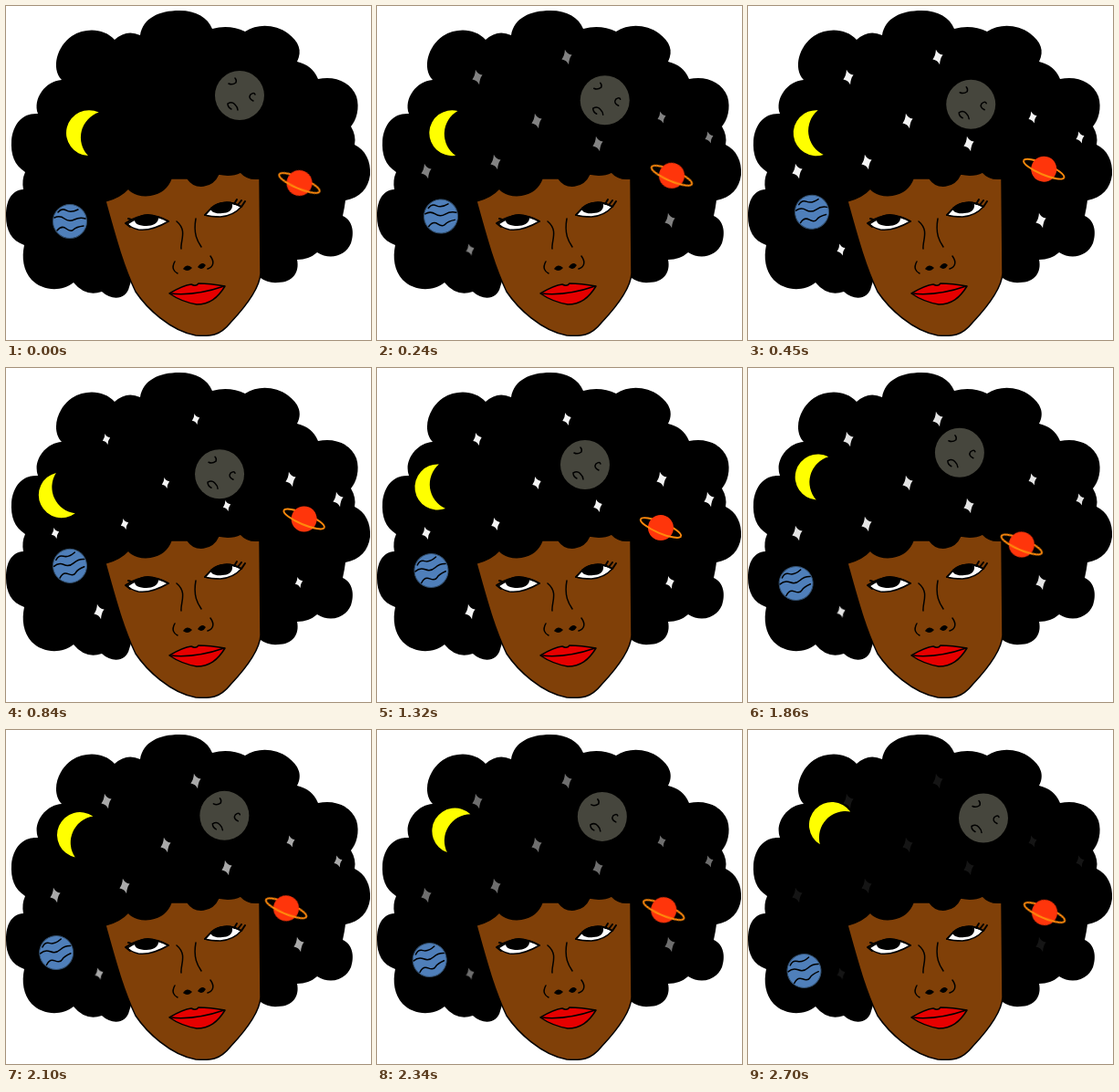
An HTML page for the animation above (2.73 s loop, 400 px wide and 366 px high).

```html
<!DOCTYPE html>
<html lang="en">
<head>
<meta charset="utf-8">
<title>Cosmic hair</title>
<style>
  html, body { margin: 0; width: 100%; height: 100%; overflow: hidden; background: #fff; }
  svg { display: block; width: 100%; height: 100%; }
  .line { fill: none; stroke: #000; stroke-width: 1.5; stroke-linecap: round; stroke-linejoin: round; }
</style>
</head>
<body>
<svg viewBox="0 0 400 366">
  <path id="hair" d="M147 32C150 13 168 5 190 5C209 5 221 13 226 25Q245 20 262 28C276 19 295 20 309 30C321 39 325 49 319 61Q336 65 342 80C360 76 378 83 384 99C388 112 384 125 378 132Q384 142 382 152C394 158 400 170 399 185C397 200 388 210 372 213Q371 221 369 230C380 235 382 248 378 260C372 274 355 279 341 270Q332 278 319 278C322 292 314 303 298 303Q287 304 279 298L240 260L150 260L135 308C132 321 117 324 105 313Q87 319 74 303C60 314 40 312 28 300C19 290 17 276 20 262C6 257 0 246 0 230C0 213 6 202 19 201Q17 191 21 182C9 174 5 163 6 147C8 129 18 117 35 118C29 102 43 82 61 81C49 68 56 44 72 33C88 23 108 25 119 37Q132 25 147 32Z"/>
  <g class="line">
    <path fill="#804008" d="M109 214Q125 210 134 200C144 212 173 211 181 189Q192 189 199 189C207 201 226 200 233 184Q247 187 257 182Q265 191 278 189L279 293C278 310 262 330 246 347C234 362 224 362 208 361C180 356 154 331 142 313C128 284 119 250 109 214Z"/>
    <path fill="#fff" d="M133 239Q155 223 178 236Q159 247 145 245Q137 243 133 239Z"/>
    <path fill="#000" stroke="none" d="M141 233Q154 224 167 231C168 238 160 241 154 241C146 241 140 239 141 233Z"/>
    <path stroke-width="2" d="M131 238Q155 222 178 236M131 238l5 4M137 234l-3-1"/>
    <path fill="#fff" d="M218 229Q236 207 258 220Q249 230 235 231Q224 231 218 229Z"/>
    <path fill="#000" stroke="none" d="M224 221Q236 211 248 217C249 224 243 227 237 227C230 228 224 226 224 221Z"/>
    <path stroke-width="2" d="M218 229Q235 207 258 220M250 217l3-5M254 218l4-5M258 220l4-6"/>
    <path d="M187 236C199 246 191 257 192 266M208 233C205 250 210 258 214 264M185 280C181 287 184 291 188 293M224 274C229 281 227 286 221 288"/>
    <path fill="#000" d="M195 288q3-5 8-1q-4 4-8 1M211 286q3-5 7-2q-3 5-7 2"/>
    <path fill="#e60000" d="M179 315Q194 306 203 305Q208 308 211 304Q223 304 240 307C232 320 223 327 209 327Q192 324 179 315Z"/>
    <path d="M180 315Q207 318 239 307"/>
  </g>
  <g id="stars" fill="#f4f4f4"></g>
  <path id="crescent" fill="#ff0" d="M3.5-24.5A25 25 0 1 0 3.5 24.5A29 29 0 0 1 3.5-24.5Z"/>
  <g id="moon">
    <circle r="27" fill="#46463d"/>
    <path class="line" d="M-12-13q4 2 8-1q1-3-1-5M15 6q-6-3-3-7q4-3 5 0M-13 9q5-3 8 1q3 3 3 6M-13 9q0 4 4 6"/>
  </g>
  <g id="blue">
    <circle r="18.5" fill="#4f7fba" stroke="#33506f"/>
    <path class="line" stroke-width="1.2" d="M-13-10q4-5 9-2t13-1M-17-4q6-3 11 1t11 1t12-1M-14 10q5-6 10-2t8 1t11-4"/>
  </g>
  <g id="ringed">
    <g transform="rotate(23)" fill="none" stroke="#ff8a0c" stroke-width="2">
      <path d="M-24 0A24 6 0 0 1 24 0"/>
      <circle r="14" fill="#ff350b" stroke="none"/>
      <path d="M-24 0A24 6 0 0 0 24 0"/>
    </g>
  </g>
</svg>
<script>
  const LOOP = 2730, LEG = 900;
  const byId = id => document.getElementById(id);
  const mix = (a, b, u) => a + (b - a) * u;
  const clamp = u => Math.max(0, Math.min(1, u));

  // Linear interpolation over [time, value] pairs
  function track(keys, t) {
    let i = 1;
    while (i < keys.length - 1 && t > keys[i][0]) i++;
    const [t0, a] = keys[i - 1], [t1, b] = keys[i];
    return mix(a, b, clamp((t - t0) / (t1 - t0)));
  }

  // Three legs: straight, curved around a control point, straight
  const bodies = [
    { id: 'crescent', path: [[92.5, 139.5], [60, 138.5], [68.5, 129.7], [77, 121], [93, 105]],
      turn: [[0, 14], [900, -28], [1800, 14], [2700, 43]] },
    { id: 'moon', path: [[256, 98], [232.5, 117.5], [224.5, 105.4], [230, 92.5], [258, 96.5]] },
    { id: 'blue', path: [[70, 236], [70, 215.5], [56.8, 220.5], [52, 234], [61.5, 264]],
      turn: [[0, 0], [900, -16]] },
    { id: 'ringed', path: [[321.5, 194], [327, 163.5], [307.6, 173.7], [298, 193], [325, 200]] }
  ];

  function position(path, t) {
    const leg = Math.min(2, Math.floor(t / LEG)), u = clamp(t / LEG - leg);
    const [a, b, c, d, e] = path;
    return [0, 1].map(k =>
      leg === 0 ? mix(a[k], b[k], u) :
      leg === 2 ? mix(d[k], e[k], u) :
      mix(mix(b[k], c[k], u), mix(c[k], d[k], u), u));
  }

  const mainPulse = [[0, 1], [450, 1], [900, .7], [1800, 1], [2700, 1]];
  const sidePulse = [[0, .8], [450, .8], [540, 1], [1650, 1], [1800, .8], [2700, .8]];
  const fade = [[0, 0], [450, 1], [1800, 1], [2790, 0]];
  const starField = byId('stars');

  const addStars = (pulse, points) => points.map(([x, y]) => {
    const el = document.createElementNS('http://www.w3.org/2000/svg', 'path');
    el.setAttribute('d', 'M0-8.5Q1-3 6-1Q2 2 0 8.5Q-1 3-6 1Q-2-2 0-8.5Z');
    starField.append(el);
    return { el, x, y, pulse };
  });

  const stars = [
    ...addStars(mainPulse, [[110, 78], [208, 56], [175, 126], [130, 171], [242, 151], [54, 181], [321, 235]]),
    ...addStars(sidePulse, [[312, 122], [364, 144], [102, 267]])
  ];

  function draw() {
    const t = performance.now() % LOOP;
    for (const { id, path, turn } of bodies) {
      const [x, y] = position(path, t);
      byId(id).setAttribute('transform', `translate(${x} ${y}) rotate(${turn ? track(turn, t) : 0})`);
    }
    starField.setAttribute('opacity', track(fade, t));
    for (const { el, x, y, pulse } of stars)
      el.setAttribute('transform', `translate(${x} ${y}) rotate(-14) scale(${track(pulse, t)})`);
    requestAnimationFrame(draw);
  }
  draw();
</script>
</body>
</html>
```
